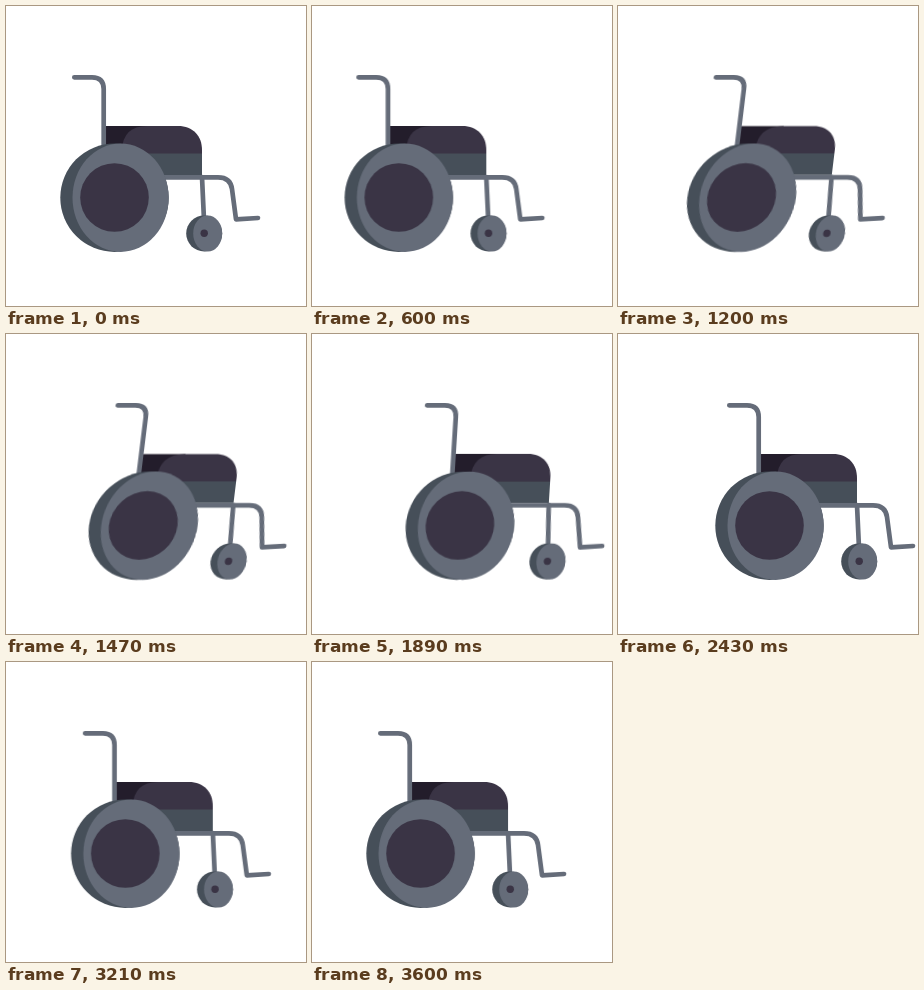
Animation of 300x300 px, one loop 5.63 s. Source, as an HTML page:

```html
<!DOCTYPE html>
<html lang="en">
<head>
<meta charset="utf-8">
<title>Rolling wheelchair</title>
<style>
  html, body { margin: 0; width: 100%; height: 100%; overflow: hidden; background: #fff; }
  svg { display: block; width: 100%; height: 100%; }

  .roll { animation: roll 5630ms infinite; }
  .lean { transform-origin: 0 192px; animation: lean 5630ms infinite; }

  .tube { fill: none; stroke: #656c79; stroke-width: 4.7; stroke-linecap: round; stroke-linejoin: round; }
  .rim, .base { fill: #464f59; }
  .face { fill: #656c79; }
  .dark { fill: #3a3445; }
  .back { fill: #231d2b; }

  /* pull back, push forward, return, rest */
  @keyframes roll {
    0%       { transform: translateX(0);       animation-timing-function: ease-in-out; }
    10.746%  { transform: translateX(-21.7px); animation-timing-function: ease; }
    42.984%  { transform: translateX(43px);    animation-timing-function: ease-in-out; }
    64.476%, 100% { transform: translateX(0); }
  }
  @keyframes lean {
    0%, 10.746% { transform: skewX(0deg);    animation-timing-function: cubic-bezier(.3, .1, .4, 1); }
    23.979%     { transform: skewX(-7.2deg); animation-timing-function: ease-in-out; }
    42.984%, 100% { transform: skewX(0deg); }
  }
</style>
</head>
<body>
<svg viewBox="0 0 300 300">
  <g class="roll"><g class="lean">
    <path class="back" d="M98 120H142V150H98Z"/>
    <path class="base" d="M120 146H196V169H120Z"/>
    <path class="dark" d="M116 147.500V144Q117 120 141 120H172C187 120 196 130 196 144V147.500Z"/>
    <path class="tube" d="M68.300 71.300H86Q97.700 71.300 97.700 83V145"/>
    <path class="tube" d="M196 171L198 214"/>
    <path class="tube" d="M140 171.300H212Q224.500 171.300 226 183L230 213.300L252 212"/>

    <circle class="rim" cx="108.500" cy="191.700" r="54.200"/>
    <ellipse class="face" cx="114.600" cy="191.700" rx="48.100" ry="54.200"/>
    <circle class="dark" cx="108.500" cy="191.500" r="34.300"/>

    <circle class="rim" cx="198.200" cy="227.400" r="18"/>
    <ellipse class="face" cx="201.700" cy="227.400" rx="14.500" ry="18"/>
    <circle class="dark" cx="198.200" cy="227.300" r="3.700"/>
  </g></g>
</svg>
</body>
</html>
```
